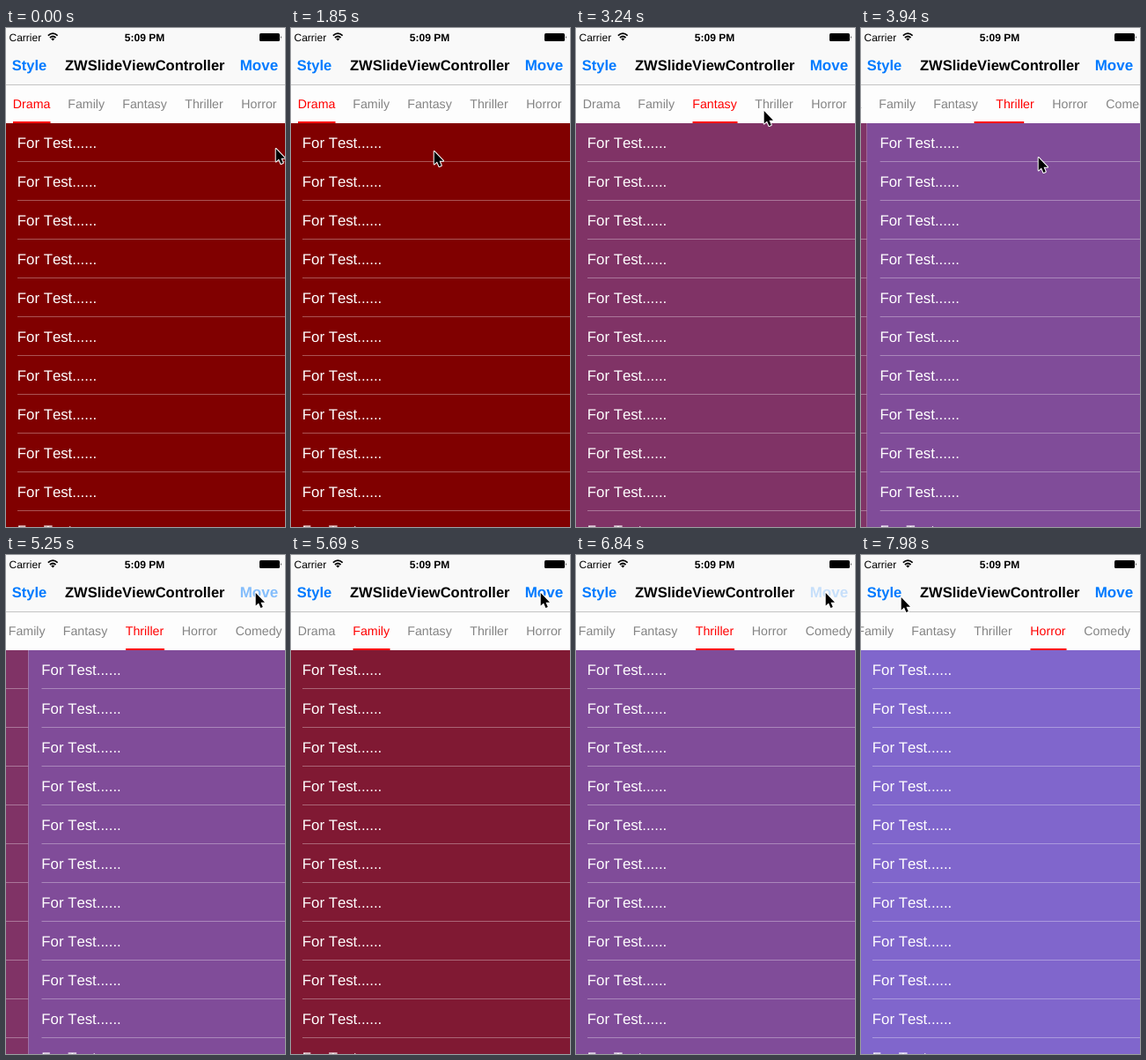
These frames come from a looping animation (317 px wide and 566 px high, 8 s). An HTML page:

```html
<!DOCTYPE html>
<html lang="en">
<head>
<meta charset="utf-8">
<title>Slide view</title>
<style>
  html, body { margin: 0; width: 100%; height: 100%; overflow: hidden; background: #fff; }
  svg { display: block; width: 317px; height: 566px; }
  text {
    font-family: "Liberation Sans", Arial, sans-serif;
    font-kerning: none;
    text-rendering: geometricPrecision;
    white-space: pre;
  }
  .bar { font-size: 12px; }
  .head { font-size: 16.5px; font-weight: bold; }
  .link { fill: #007aff; }
  .tab { font-size: 14.2px; fill: #848484; }
  .tab.on { fill: #f00; }
  .row { font-size: 16.8px; fill: #fff; }
</style>
</head>
<body>
<svg id="stage" viewBox="0 0 317 566">
  <g id="pages"></g>
  <rect width="317" height="108" fill="#fdfdfd"/>
  <g id="tabs"><rect id="mark" y="106" height="2" fill="#f00"/></g>
  <rect width="317" height="64" fill="#f9f9f9"/>
  <rect y="64" width="317" height="1" fill="#c4c4c4"/>
  <text class="bar" x="3.5" y="15">Carrier</text>
  <g fill="none" stroke="#000" stroke-width="1.7">
    <path d="M47.8 8.6Q53.2 3.8 58.6 8.6"/>
    <path d="M49.9 11Q53.2 8 56.5 11"/>
  </g>
  <path d="M51.2 12.2Q53.2 10.8 55.2 12.2L53.2 14.4Z"/>
  <text class="bar" x="134.8" y="15" font-weight="bold">5:09 PM</text>
  <rect x="288" y="6" width="23" height="9" rx="1.5"/>
  <path d="M312 9Q313.6 10.5 312 12Z"/>
  <text class="head link" x="6.8" y="48">Style</text>
  <text class="head" x="67" y="48">ZWSlideViewController</text>
  <text class="head link" id="move" x="265.7" y="48" style="font-size:17px">Move</text>
  <path id="cursor" d="M.7 1V15.6L4 12.6L6.4 18L8.8 17L6.5 11.7H11Z"
        stroke="#fff" stroke-width="2" stroke-linejoin="round" paint-order="stroke"/>
</svg>
<script>
// Pages are 320 wide; the stage cuts 2 off their left side.
const W = 320, CUT = 2, LOOP = 8000, TICK = 87.7;
const $ = id => document.getElementById(id);

const tabs = [
  { name: 'Drama', x: 8, w: 42.5, scroll: 0 },
  { name: 'Family', x: 70.5, w: 42, scroll: 0 },
  { name: 'Fantasy', x: 132.5, w: 51, scroll: 0 },
  { name: 'Thriller', x: 203.5, w: 44, scroll: 67.5 },
  { name: 'Horror', x: 267.5, w: 41, scroll: 75 },
  { name: 'Comedy', x: 328.5, w: 54, scroll: 75 }
];

// Times below are in ticks.
const path = [
  [0, 306, 136], [1, 268, 132], [2, 227, 130], [3, 227, 130],
  [6, 176, 117], [9, 102, 86], [11, 105, 90], [14, 105, 90],
  [18, 161, 140], [20, 161, 140], [21, 162, 139], [26, 123, 89],
  [27, 123, 89], [29, 152, 92], [33, 152, 92], [37, 213, 93],
  [39, 221, 153], [40, 221, 153], [43, 201, 146], [51, 201, 146],
  [57, 283, 42], [87, 283, 42], [91, 45, 47]
];
const presses = [58, 70, 78];
const slides = [
  { from: 0, to: 2, start: 28.5, span: 4, mark: 29.5 },
  { from: 2, to: 3, start: 40.5, span: 6.43, mark: 43, flick: true },
  { from: 3, to: 1, start: 59.5, span: 4, mark: 61 },
  { from: 1, to: 3, start: 70.5, span: 4, mark: 72 },
  { from: 3, to: 4, start: 79.5, span: 4, mark: 81 }
];

const clamp = u => Math.min(1, Math.max(0, u));
const smooth = u => u * u * (3 - 2 * u);
const out = u => 1 - (1 - u) ** 3;
const mix = (a, b, u) => a + (b - a) * u;

function add(parent, tag, attrs, text = '') {
  const el = document.createElementNS('http://www.w3.org/2000/svg', tag);
  for (const key in attrs) el.setAttribute(key, attrs[key]);
  el.textContent = text;
  return parent.appendChild(el);
}

tabs.forEach((tab, i) => {
  tab.el = add($('tabs'), 'text', { class: 'tab', x: tab.x - .2, y: 91 }, tab.name);
  const page = add($('pages'), 'g', { transform: `translate(${i * W} 0)` });
  add(page, 'rect', { y: 108, width: W, height: 458, fill: `rgb(128,${25.4 * i},${51 * i})` });
  for (let y = 130; y < 580; y += 44) {
    add(page, 'text', { class: 'row', x: 14.8, y: y + 5.6 }, 'For Test......');
    add(page, 'rect', { x: 15, y: y + 21, width: W - 15, height: 1, fill: '#fff', 'fill-opacity': .33 });
  }
});

function pointer(k) {
  const n = path.findIndex(p => p[0] > k);
  if (n < 0) return path[path.length - 1].slice(1);
  const a = path[n - 1], b = path[n], u = (k - a[0]) / (b[0] - a[0]);
  return [mix(a[1], b[1], u), mix(a[2], b[2], u)];
}

function draw(ms) {
  const k = Math.floor((ms + 12) / TICK);
  let page = 0, scroll = 0, left = tabs[0].x, right = left + tabs[0].w, on = 0;
  for (const s of slides) {
    if (k < s.start) break;
    const a = tabs[s.from], b = tabs[s.to];
    const part = span => smooth(clamp((k - s.mark) / span));
    const lead = part(2.78), lag = part(3.33), ahead = s.to > s.from;
    page = mix(s.from, s.to, (s.flick ? out : smooth)(clamp((k - s.start) / s.span)));
    scroll = mix(a.scroll, b.scroll, part(3));
    left = mix(a.x, b.x, ahead ? lag : lead);
    right = mix(a.x + a.w, b.x + b.w, ahead ? lead : lag);
    if (k >= s.mark) on = s.to;
  }
  $('pages').setAttribute('transform', `translate(${-CUT - page * W} 0)`);
  $('tabs').setAttribute('transform', `translate(${-scroll} 0)`);
  $('mark').setAttribute('x', left);
  $('mark').setAttribute('width', right - left);
  tabs.forEach((tab, i) => tab.el.classList.toggle('on', i === on));

  const press = presses.filter(p => p <= k).pop();
  $('move').setAttribute('opacity', press === undefined ? 1 : mix(.2, 1, clamp((k - press - 1) / 3)));
  $('cursor').setAttribute('transform', `translate(${pointer(k).join(' ')})`);
}

const begin = performance.now();
function loop() {
  draw((performance.now() - begin) % LOOP);
  requestAnimationFrame(loop);
}
loop();
</script>
</body>
</html>
```
